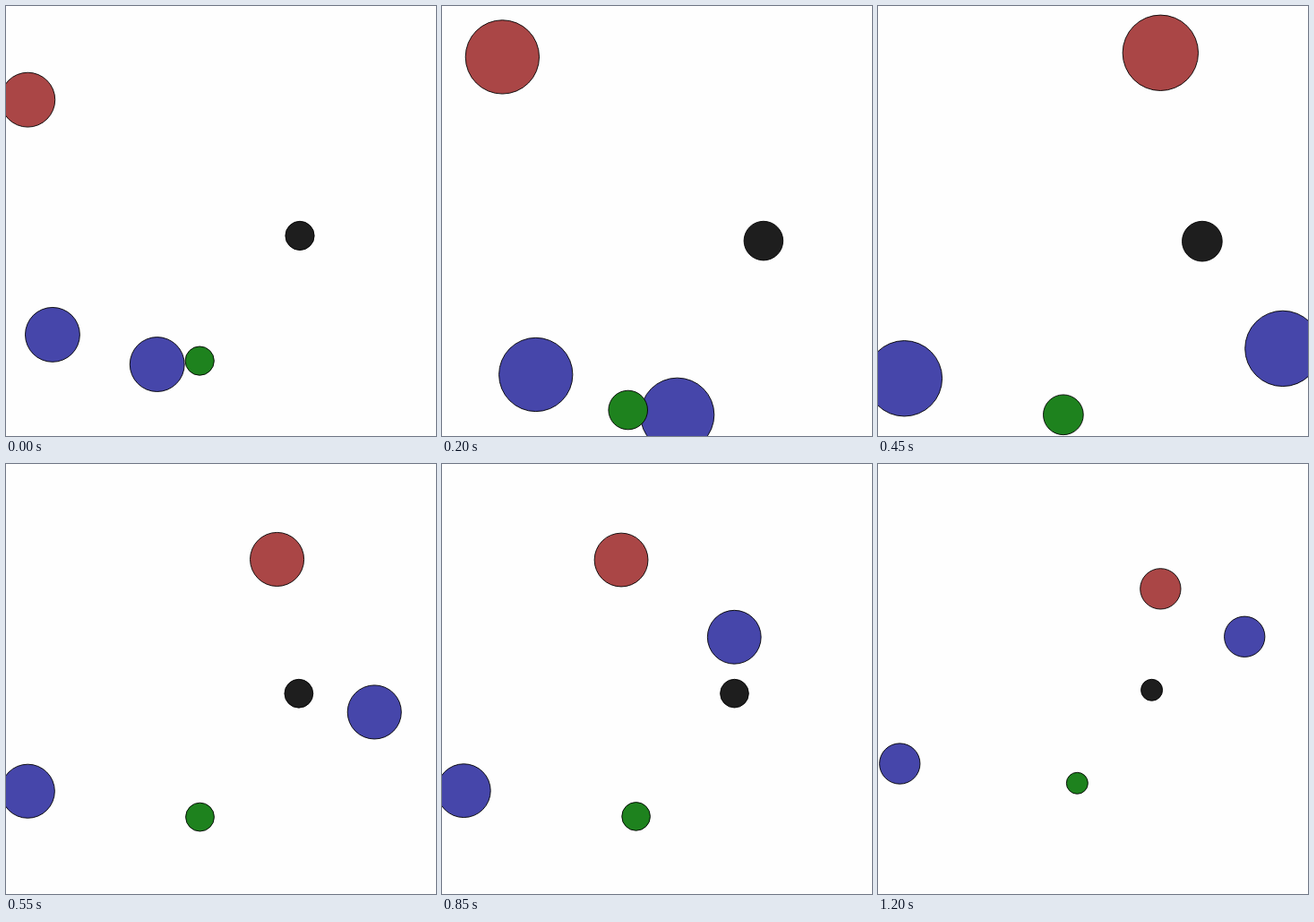
An HTML page for the animation above (1250 ms loop, 480 by 480 pixels).

```html
<!DOCTYPE html>
<html lang="en">
<head>
<meta charset="utf-8">
<title>Agents and landmarks</title>
<style>
html, body { margin: 0; width: 100%; height: 100%; overflow: hidden; background: #fefefe; }
svg { display: block; width: 100vw; height: 100vh; }
circle { stroke: #000; stroke-width: .9; }
</style>
</head>
<body>
<svg id="stage" viewBox="0 0 480 480"></svg>
<script>
const STEP = 50, COUNT = 25;
const DAMPING = 0.75, PUSH = 0.375; // per step
const MID = 240.3, REACH = 216;
const AGENT = 1.01, LANDMARK = 0.535; // radii
const DIRS = { r: [1, 0], l: [-1, 0], u: [0, -1], d: [0, 1], '.': [0, 0] };

// Agents are steered by one letter per step; landmarks stay put.
const bodies = [
  { x: -7.167, y: -4.5, r: AGENT, fill: '#aa4646', moves: 'rrrrrrrr.llllllrrrrrrrll' },
  { x: -6.25, y: 4.2, r: AGENT, fill: '#4646aa', moves: 'rrrrllllllllrrrrrlllllrr' },
  { x: -2.375, y: 5.3, r: AGENT, fill: '#4646aa', moves: 'rrrrrruuuuulllrllrrrrrrr' },
  { x: 2.91, y: 0.535, r: LANDMARK, fill: '#1e1e1e', moves: '' },
  { x: -0.8, y: 5.17, r: LANDMARK, fill: '#1e821e', moves: '' }
];

function trace({ x, y, moves }) {
  const path = [[x, y]];
  let vx = 0, vy = 0;
  for (let i = 0; i < COUNT - 1; i++) {
    const [ax, ay] = DIRS[moves[i] || '.'];
    vx = vx * DAMPING + ax * PUSH;
    vy = vy * DAMPING + ay * PUSH;
    path.push([x += vx, y += vy]);
  }
  return path;
}

const stage = document.getElementById('stage');
for (const b of bodies) {
  b.path = trace(b);
  b.node = document.createElementNS(stage.namespaceURI, 'circle');
  b.node.setAttribute('fill', b.fill);
  stage.append(b.node);
}

// The camera zooms so that the farthest centre sits on the margin.
function draw(time) {
  const i = Math.floor(time / STEP) % COUNT;
  const far = Math.max(...bodies.flatMap(b => b.path[i].map(Math.abs)));
  const zoom = REACH / far;
  for (const { node, path, r } of bodies) {
    node.setAttribute('cx', MID + path[i][0] * zoom);
    node.setAttribute('cy', MID + path[i][1] * zoom);
    node.setAttribute('r', r * zoom);
  }
}

const start = performance.now();
function tick() {
  draw(performance.now() - start);
  requestAnimationFrame(tick);
}
tick();
</script>
</body>
</html>
```
